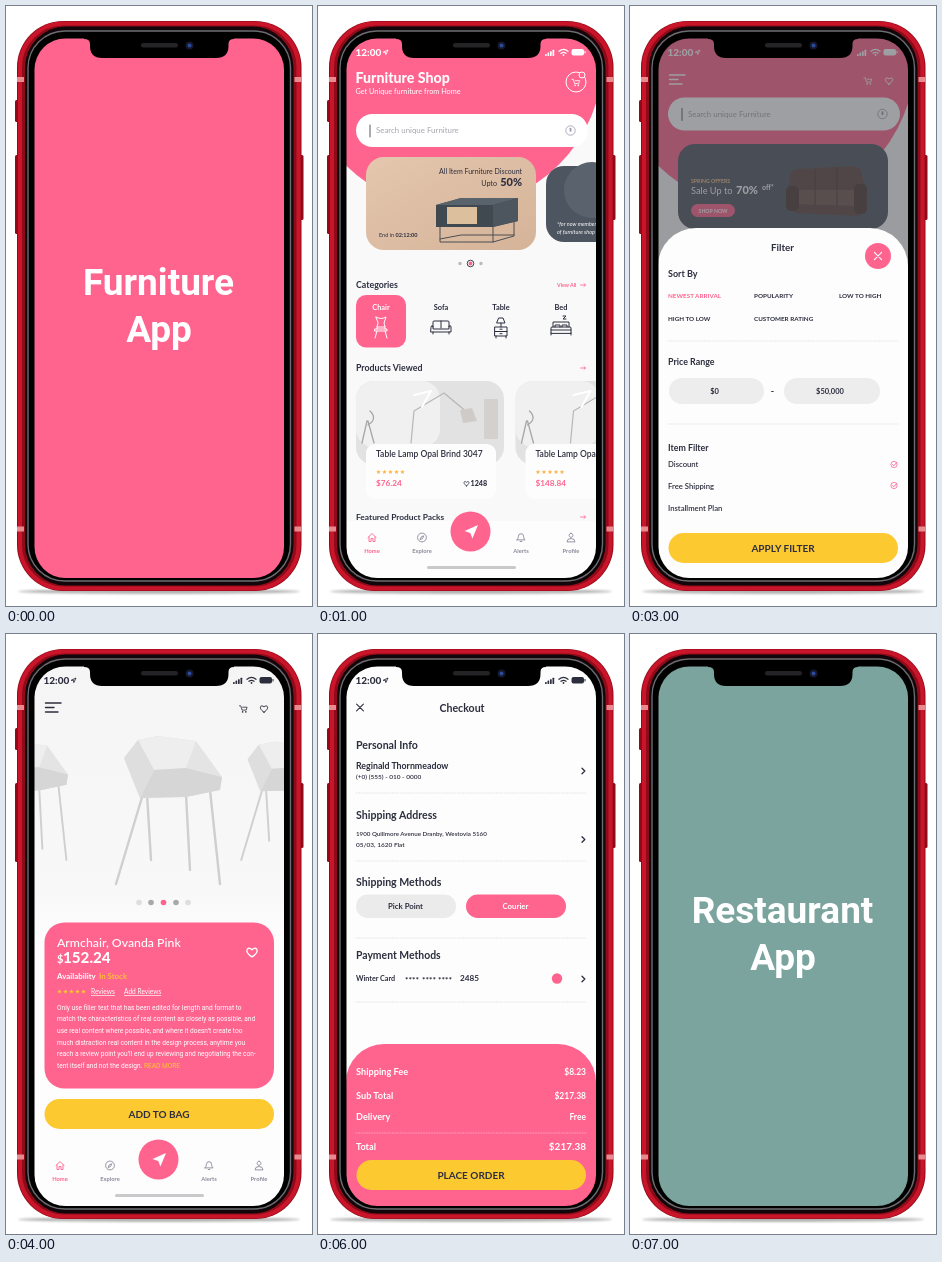
Write an HTML page that moves like this. It is 306x600 px and loops after 8000 ms.

```html
<!DOCTYPE html>
<html lang="en">
<head>
<meta charset="utf-8">
<title>App screens</title>
<style>
html, body { margin: 0; width: 100%; height: 100%; overflow: hidden; background: #fff; }
svg { display: block; width: 306px; height: 600px; font-family: Lato, "Open Sans", sans-serif; }
.roboto { font-family: Roboto, sans-serif; }
</style>
</head>
<body>
<script>
const PINK = '#ff648f', INK = '#2c2e3e', YELLOW = '#fdc930', TEAL = '#7aa49d', GREY = '#8b8a9b', WHITE = '#fff', PAPER = '#fdfdfd';

// Drawing helpers
const text = (x, y, size, str, fill = INK, weight = 700, anchor = 'start', extra = '') =>
  `<text x="${x}" y="${y}" font-size="${size}" fill="${fill}" font-weight="${weight}" text-anchor="${anchor}" ${extra}>${str}</text>`;
const mid = (x, y, size, str, fill = INK, weight = 700) => text(x, y, size, str, fill, weight, 'middle');
const end = (x, y, size, str, fill = INK, weight = 700) => text(x, y, size, str, fill, weight, 'end');
const rect = (x, y, w, h, r, fill, extra = '') =>
  `<rect x="${x}" y="${y}" width="${w}" height="${h}" rx="${r}" fill="${fill}" ${extra}/>`;
const disc = (x, y, r, fill, extra = '') => `<circle cx="${x}" cy="${y}" r="${r}" fill="${fill}" ${extra}/>`;
const ring = (x, y, r, color, w = 0.9) => disc(x, y, r, 'none', `stroke="${color}" stroke-width="${w}"`);
const shape = (d, fill) => `<path d="${d}" fill="${fill}"/>`;
const line = (d, color, w = 1, extra = '') =>
  `<path d="${d}" fill="none" stroke="${color}" stroke-width="${w}" stroke-linecap="round" stroke-linejoin="round" ${extra}/>`;
const at = (x, y, s, k = 1) => `<g transform="translate(${x} ${y}) scale(${k})">${s}</g>`;
const dashes = (y, color = '#dcdcdf') => line(`M38 ${y}H268`, color, 0.7, 'stroke-dasharray="1 1.6"');

// Icons, centred on their place
const heart = (x, y, k, color, w = 1) => at(x, y, line(
  `M0 ${4 * k}C${-8 * k} ${-1 * k} ${-4 * k} ${-6.5 * k} 0 ${-2.5 * k}C${4 * k} ${-6.5 * k} ${8 * k} ${-1 * k} 0 ${4 * k}Z`, color, w));
const cross = (x, y, r, color, w = 1.1) => at(x, y, line(`M${-r} ${-r}L${r} ${r}M${r} ${-r}L${-r} ${r}`, color, w));
const cart = (x, y, color) => at(x, y,
  line('M-4.5 -3.5H-3L-1.6 1.2H3L4 -2H-1', color, 0.9) + disc(-1, 3.2, 0.9, color) + disc(2.6, 3.2, 0.9, color), 0.9);
const arrow = (x, y) => line(`M${x} ${y}h5m-1.5-1.4l1.5 1.4l-1.5 1.4`, PINK, 0.8);
const chevron = y => line(`M264 ${y - 2.8}l2.8 2.8l-2.8 2.8`, INK, 1.3);
const stars = (x, y, color) => [0, 1, 2, 3, 4].map(i =>
  at(x + 2.5 + i * 6, y, shape('M0-2.6L.8-.8L2.6-.7L1.2.5L1.7 2.4L0 1.3L-1.7 2.4L-1.2.5L-2.6-.7L-.8-.8Z', color), 0.85)).join('');
const menu = color => line('M39.5 69H55M39.5 73.5H48M39.5 78H52', color, 1.4);
const tick = y => ring(264, y, 3.1, PINK, 0.8) + line(`M262.5 ${y}l1.3 1.3l3-3.4`, PINK, 0.9);
const button = (y, label) => rect(38.5, y, 229.5, 30, 15, YELLOW) + mid(153, y + 18.7, 10, label);
const dots = (xs, y) => xs.map((x, i) =>
  disc(x, y, 2.8, ['#dedede', '#a9a9ab', PINK, '#a9a9ab', '#dedede'][i])).join('');

const status = c => text(37.5, 49.5, 10, '12:00', c, 800) +
  line('M65.5 46.2L70 44L67.8 48.6L67.4 46.6Z', c, 0.9) +
  [0, 1, 2, 3].map(i => rect(227 + i * 2.5, 48 - i * 1.4, 1.7, 2 + i * 1.4, 0.4, c)).join('') +
  line('M241 45.3Q245.5 41.6 250 45.3M243 47.3Q245.5 45.4 248 47.3', c, 1.2) + disc(245.5, 49, 0.9, c) +
  rect(253.5, 43, 12.5, 6.6, 2, c) + rect(266.5, 45, 1, 2.6, 0.4, c);

const nav = () => {
  const items = [[54, 'Home', 'M-4 0L0-4L4 0M-3-.6V4H-1V1H1V4H3V-.6'], [104, 'Explore', 'M-1.7 1.7L-.7-.7L1.7-1.7L.7.7Z'],
    [203, 'Alerts', 'M-4 2.4H4Q2.6 1 2.6-1A2.6 2.8 0 0 0-2.6-1Q-2.6 1-4 2.4ZM-.8 4H.8'],
    [253, 'Profile', 'M-4 4Q-4 1 0 1Q4 1 4 4ZM0-4.2a2 2 0 1 0 .1 0Z']];
  return rect(28, 515, 250, 57, 0, PAPER, 'opacity=".96"') + items.map(([x, label, d], i) => {
    const c = i ? GREY : PINK;
    return at(x, 531.5, line(d, c, 0.9)) + (i === 1 ? ring(x, 531.5, 4.4, c) : '') + mid(x, 546.5, 5.8, label, c);
  }).join('') + disc(152.5, 525.5, 20, PINK) + shape('M146.5 525L160 519L154.4 532.5L152.3 527Z', WHITE) +
  rect(109, 560, 89, 3, 1.5, '#c9c9cb');
};

const hero = () => rect(28, 32, 250, 540, 0, '#f9f9fa') + disc(134, 52, 151, PINK);
const search = (y, label) => rect(38, y, 232, 33, 16.5, WHITE) + line(`M52 ${y + 11}v12`, INK, 0.8) +
  text(58, y + 19.3, 7.9, label, '#a5a5ad', 400) + ring(252.5, y + 16.5, 4.7, '#9a9ab0', 0.8) +
  rect(251.6, y + 13.7, 1.8, 4, 0.9, '#9a9ab0');

// Furniture drawings
const furniture = [
  c => line('M-5-10Q0-7 5-10L3-4L4 0H-4L-3-4ZM-6 2H6V4H-6ZM-4 4L-6 11M4 4L6 11M-4 0V2M4 0V2', c, 1),
  c => line('M-8 0V-5Q-8-6-7-6H7Q8-6 8-5V0M0-6V1M-10 0Q-10-2-8-1V2H8V-1Q10-2 10 0V5H-10ZM-8 5V7M8 5V7', c, 1),
  c => line('M-6 0H6V9H-6ZM-6 4.5H6M-1 2.2H1M-1 6.7H1M-5 9V11M5 9V11M0 0V-4M-4-4H4L2-9H-2Z', c, 1),
  c => line('M-8 0V-5H8V0M-10 6V1Q-10 0-9 0H9Q10 0 10 1V6ZM-10 6V8M10 6V8M-6 0V-2H-1V0M1 0V-2H6V0M2-11H5L2-8H5M-10 3H10', c, 1)];

const sideboard = () =>
  line('M122 220V236H175L196 230V216M175 220V236M122 233L143 229H196', '#4a4f55', 1) +
  shape('M118 199L143 192H200V215L175 221H118Z', '#414950') + shape('M118 199L143 192H200L175 199Z', '#59636b') +
  shape('M175 199L200 192V215L175 221Z', '#4d565e') + rect(129, 201, 30, 17, 0, '#dcbf9c');

const lampCard = (x, price) => rect(x, 375, 148, 84, 18, '#e3e2e2') + rect(x, 375, 84, 66, 18, '#f1f0f0') +
  at(x, 375, line('M55 62L58 30L88 12L112 32', '#b9b6b4', 1.2) + shape('M104 29L116 27L121 40L107 42Z', '#cfcbc8') +
    line('M6 62L11 40M18 62L12 40M14 30Q22 38 12 44', '#a9a5a2', 1.3) + line('M58 14L75 10L66 26', WHITE, 2) +
    rect(128, 18, 14, 40, 1, '#d3d0ce')) +
  rect(x + 10, 438, 130, 55, 9, PAPER) + text(x + 20, 451, 8.5, 'Table Lamp Opal Brind 3047', INK, 600) +
  stars(x + 20, 466, '#fdb54a') + text(x + 20, 480, 8.2, price, PINK) +
  heart(x + 110.5, 477.7, 0.55, INK, 0.8) + text(x + 114.5, 480, 7.2, '1248', INK, 800);

const chair = (x, y, k) => at(x, y,
  line('M-29 160L-56 250M-25 160L-21 226M14 160L18 236M38 156L48 250', '#cfcfcf', 2.4) +
  shape('M-48 124L-34 106L-14 102L24 107L50 143L48 156L14 163L-32 164Z', '#e4e4e4') +
  shape('M-34 106L-14 102L24 107L14 134L-18 136Z', '#eeeeee') +
  shape('M-18 136L14 134L50 143L48 156L14 163L-32 164Z', '#d6d6d6') +
  shape('M-48 124L-34 106L-18 136L-32 164Z', '#dedede'), k);

// Screens
const splash = (word, color) => rect(28, 32, 250, 540, 0, color) +
  `<g class="roboto">${mid(152.5, 289, 37, word, WHITE)}${mid(153, 336, 37, 'App', WHITE)}</g>`;

const home = () => hero() + status(WHITE) +
  text(37.5, 77, 14.2, 'Furniture Shop', WHITE, 800) + text(37.5, 88, 7.3, 'Get Unique furniture from Home', WHITE, 400) +
  ring(258, 76, 10, WHITE, 1) + cart(258, 76.5, WHITE) + disc(264, 69, 3, PINK, 'stroke="#fff"') +
  search(108, 'Search unique Furniture') +
  rect(48, 151, 170, 93, 18, 'url(#sand)') + sideboard() +
  end(204, 168, 7, 'All Item Furniture Discount', INK, 400) + end(179, 180, 7.2, 'Upto', INK, 400) + end(204, 180, 11, '50%', INK, 800) +
  text(61, 231, 5.5, 'End in <tspan font-weight="700">02:12:00</tspan>', INK, 400) +
  rect(228, 160, 80, 76, 18, '#4d5560') + disc(274, 184, 28, '#59626d') +
  text(239, 220, 5.5, '*for now members', WHITE, 400, 'start', 'font-style="italic"') +
  text(239, 227.5, 5.5, 'of furniture shop', WHITE, 400, 'start', 'font-style="italic"') +
  disc(142, 257.5, 1.7, '#b8b8be') + ring(152.5, 257.5, 3.3, INK) + disc(152.5, 257.5, 1.9, PINK) + disc(163, 257.5, 1.7, '#b8b8be') +
  text(38, 282, 8.8, 'Categories') + text(239, 281, 5.3, 'View All', PINK) + arrow(262.5, 279) +
  rect(38, 289, 50, 52.5, 10, PINK) +
  ['Chair', 'Sofa', 'Table', 'Bed'].map((s, i) =>
    mid(63 + i * 60, 304, 7.4, s, i ? INK : WHITE) + at(63 + i * 60, 321, furniture[i](i ? INK : WHITE))).join('') +
  text(38, 365, 8.8, 'Products Viewed') + arrow(262.5, 362) +
  lampCard(38, '$76.24') + lampCard(197.5, '$148.84') +
  text(38, 514, 8.4, 'Featured Product Packs') + arrow(262.5, 511) + nav();

const listHead = () => hero() + status(WHITE) + menu(WHITE) + cart(238, 75, WHITE) + heart(259, 75, 0.8, WHITE) +
  search(91.5, 'Search unique Furniture') +
  rect(48, 138, 210, 85, 17, '#4e535f') +
  shape('M160 172Q160 163 169 163L222 160Q232 160 232 170L236 183V204L228 210L166 207L158 198Z', '#5c4640') +
  shape('M164 184H230V200L165 198Z', '#6f574f') + rect(156, 180, 13, 25, 5, '#4b3833') + rect(224, 178, 13, 30, 5, '#4b3833') +
  line('M185 164V199M207 162V200', '#47352f', 0.9) +
  text(61, 177, 5.2, 'SPRING OFFERS', '#f3c48f') + text(61, 187.5, 9.2, 'Sale Up to', WHITE, 400) +
  text(106, 187.5, 11, '70%', WHITE, 800) + text(132, 184, 7, 'off*', WHITE) +
  rect(61, 198, 44, 13, 6.5, PINK) + mid(83, 206.6, 5.2, 'SHOP NOW', WHITE);

const product = (x, y, i) => rect(x, y, 110, 116, 16, WHITE) + rect(x, y, 110, 70, 16, '#ebeaea') +
  at(x + 55, y + 36, furniture[i]('#a9a6a4'), 2.1) +
  text(x + 10, y + 84, 7.6, ['Chair', 'Sofa', 'Table', 'Bed'][i]) + stars(x + 10, y + 94, '#fdb54a') +
  text(x + 10, y + 108, 7.4, ['$152.24', '$217.38', '$76.24', '$148.84'][i], PINK) + heart(x + 96, y + 105, 0.7, INK, 0.8);

const list = () => listHead() + text(38, 246, 8.8, 'Categories') + text(239, 245, 5.3, 'View All', PINK) +
  [0, 1, 2, 3].map(i => product(38 + i % 2 * 120, 257 + (i >> 1) * 127, i)).join('') + nav();

const filter = () => listHead() + rect(28, 32, 250, 540, 0, 'rgba(70,72,78,.52)') +
  rect(28, 222, 250, 390, 38, PAPER) + mid(152.5, 245, 9.8, 'Filter') +
  disc(248, 250, 13, PINK) + cross(248, 250, 3.6, WHITE) +
  text(38, 271, 9, 'Sort By') +
  [[38, 291.5, 'NEWEST ARRIVAL', PINK], [124, 291.5, 'POPULARITY'], [209, 291.5, 'LOW TO HIGH'],
    [38, 314.5, 'HIGH TO LOW'], [124, 314.5, 'CUSTOMER RATING']].map(([x, y, s, c]) => text(x, y, 6.3, s, c)).join('') +
  dashes(335) + text(38, 359, 8.9, 'Price Range') +
  rect(39, 372, 95, 26, 13, '#ededed') + rect(154, 372, 96, 26, 13, '#ededed') +
  mid(84.5, 387.5, 7.5, '$0') + mid(142.5, 387.5, 9, '-') + mid(200, 387.5, 7.5, '$50,000') +
  dashes(418) + text(38, 445, 8.8, 'Item Filter') +
  text(38, 461, 7.7, 'Discount', INK, 600) + text(38, 482.5, 7.7, 'Free Shipping', INK, 600) + text(38, 505, 7.7, 'Installment Plan', INK, 600) +
  tick(458.5) + tick(479.5) + button(527, 'APPLY FILTER');

const copy = ['Only use filler text that has been edited for length and format to',
  'match the characteristics of real content as closely as possible, and',
  'use real content where possible, and where it doesn’t create too',
  'much distraction real content in the design process, anytime you',
  'reach a review point you’ll end up reviewing and negotiating the con-',
  `tent itself and not the design. <tspan fill="${YELLOW}">READ MORE</tspan>`];

const detail = () => rect(28, 32, 250, 540, 0, 'url(#studio)') + status(INK) + menu(INK) + cart(237.5, 75, INK) + heart(258, 75, 0.8, INK) +
  chair(22, 26, 0.8) + chair(280, 26, 0.8) + chair(166, 0, 1) + dots([133, 145, 157.5, 170, 182], 268.5) +
  rect(38.5, 288.5, 229.5, 166, 20, PINK) + text(51, 313, 12.3, 'Armchair, Ovanda Pink', WHITE, 500) +
  text(51, 329, 11, '$', WHITE) + text(57, 329, 15.2, '152.24', WHITE, 800) + heart(246, 318.5, 1.1, WHITE, 1.3) +
  text(51, 345, 7.9, 'Availability', WHITE) + text(93, 345, 7.9, 'In Stock', YELLOW, 600) +
  stars(51, 357.5, YELLOW) +
  text(85, 360, 6.6, 'Reviews', WHITE, 400, 'start', 'text-decoration="underline"') +
  text(118, 360, 6.6, 'Add Reviews', WHITE, 400, 'start', 'text-decoration="underline"') +
  `<g class="roboto">${copy.map((s, i) => text(51, 375.5 + i * 11.7, 6.6, s, WHITE, 400)).join('')}</g>` +
  button(465, 'ADD TO BAG') + nav();

const heading = title => rect(28, 32, 250, 540, 0, PAPER) + status(INK) + cross(42, 73.5, 3.4, INK) + mid(144, 77.5, 10.6, title);
const totals = label => rect(28, 410, 250, 200, 38, PINK) +
  [[441, 'Shipping Fee', '$8.23'], [464.5, 'Sub Total', '$217.38'], [486, 'Delivery', 'Free'], [516, 'Total', '$217.38']]
    .map(([y, a, b], i) => text(38, y, 9.2, a, WHITE) + end(268, y, i > 2 ? 10 : 8.5, b, WHITE)).join('') +
  dashes(499, '#ffb3c8') + button(526, label);

const bagRow = (y, i, name, price) => rect(38, y, 72, 68, 14, '#efeeee') +
  at(74, y + 34, furniture[i]('#a9a6a4'), 1.8) +
  text(120, y + 18, 8.5, name, INK, 600) + stars(120, y + 31, '#fdb54a') + text(120, y + 54, 9, price, PINK) +
  rect(214, y + 43, 54, 16, 8, '#ededed') + mid(241, y + 54, 7.5, '-   1   +', INK) + dashes(y + 82);
const bag = () => heading('My Bag') + bagRow(102, 0, 'Armchair, Ovanda Pink', '$152.24') +
  bagRow(200, 2, 'Table Lamp Opal Brind 3047', '$76.24') + bagRow(298, 1, 'Sofa', '$148.84') + totals('CHECKOUT');

const checkout = () => heading('Checkout') +
  text(38, 115, 10.6, 'Personal Info') + text(38, 134.5, 8.8, 'Reginald Thornmeadow') +
  text(38, 145, 6.5, '(+0) (555) - 010 - 0000', INK, 600) + chevron(137) + dashes(159) +
  text(38, 185, 10.6, 'Shipping Address') +
  text(38, 202, 6.2, '1900 Quillmore Avenue Dranby, Westovia 5160', INK, 600) +
  text(38, 213, 6.5, '05/03, 1620 Flat', INK, 600) + chevron(205.5) + dashes(227) +
  text(38, 252, 10.6, 'Shipping Methods') +
  rect(38, 260.5, 100, 23.5, 11.7, '#ebebeb') + mid(87.5, 275, 7.8, 'Pick Point') +
  rect(148, 260.5, 100, 23.5, 11.7, PINK) + mid(197.5, 275, 7.8, 'Courier', WHITE) + dashes(304) +
  text(38, 325, 10.4, 'Payment Methods') + text(38, 347, 7.2, 'Winter Card') +
  [87, 104, 120].map(x => text(x, 349, 8.3, '****')).join('') + text(142, 347, 8.2, '2485') +
  disc(239, 344.5, 5.2, PINK) + chevron(345) + dashes(368) + totals('PLACE ORDER');

const screens = [splash('Furniture', PINK), home(), list(), filter(), detail(), bag(), checkout(), splash('Restaurant', TEAL)];

// Phone
const body = () => `<ellipse cx="153" cy="585.5" rx="141" ry="2.5" fill="#777" opacity=".55" filter="url(#soft)"/>` +
  [[94, 22], [149, 32], [163, 65]].map(([y, h]) => rect(9, y, 4, h, 1.5, '#8f0b18')).join('') + rect(293.5, 149, 4, 65, 1.5, '#8f0b18') +
  rect(11, 15, 284.5, 570, 46, '#8e0c19') +
  rect(14, 17.5, 278.5, 565, 43.5, 'none', 'stroke="#c9142a" stroke-width="4"') +
  [71, 520.5].map(y => rect(11, y, 7, 5, 0, '#e88a90') + rect(288.5, y, 7, 5, 0, '#e88a90')).join('') +
  rect(19, 20.5, 268.5, 559, 41, '#12060a') +
  rect(22, 25, 262.5, 550, 37, '#000', 'stroke="#6c6d70" stroke-width="1.4"');
const notch = () => shape('M78 31H228V33Q222.5 33 222.5 38V40Q222.5 52 210 52H96Q84 52 84 40V38Q84 33 78 33Z', '#000') +
  rect(135, 37, 37, 4.5, 2.2, '#242427') + disc(183.5, 39.5, 4, '#14182a') + disc(183.5, 39.5, 2, '#2b4a9c');

const defs = `<defs>
  <clipPath id="glass"><rect x="28.5" y="32.5" width="249.5" height="539.5" rx="31"/></clipPath>
  <filter id="soft" x="-10%" y="-200%" width="120%" height="500%"><feGaussianBlur stdDeviation="1"/></filter>
  <linearGradient id="sand" x2="1" y2="1"><stop stop-color="#e4c7ae"/><stop offset="1" stop-color="#d5b398"/></linearGradient>
  <linearGradient id="studio" x2="0" y2="1"><stop stop-color="#f5f5f5"/><stop offset=".42" stop-color="#f8f8f8"/><stop offset=".5" stop-color="${PAPER}"/></linearGradient>
</defs>`;

document.body.innerHTML = `<svg viewBox="0 0 306 600">${defs}${body()}<g clip-path="url(#glass)">${
  screens.map(s => `<g class="screen">${s}</g>`).join('')}</g>${notch()}</svg>`;

const HOLD = 1000, LOOP = HOLD * screens.length;
document.querySelectorAll('.screen').forEach((el, i) => el.animate([
  { opacity: 1, easing: 'step-end' },
  { opacity: 0, offset: HOLD / LOOP, easing: 'step-end' },
  { opacity: 0 }
], { duration: LOOP, delay: i * HOLD - LOOP, iterations: Infinity }));
</script>
</body>
</html>
```
